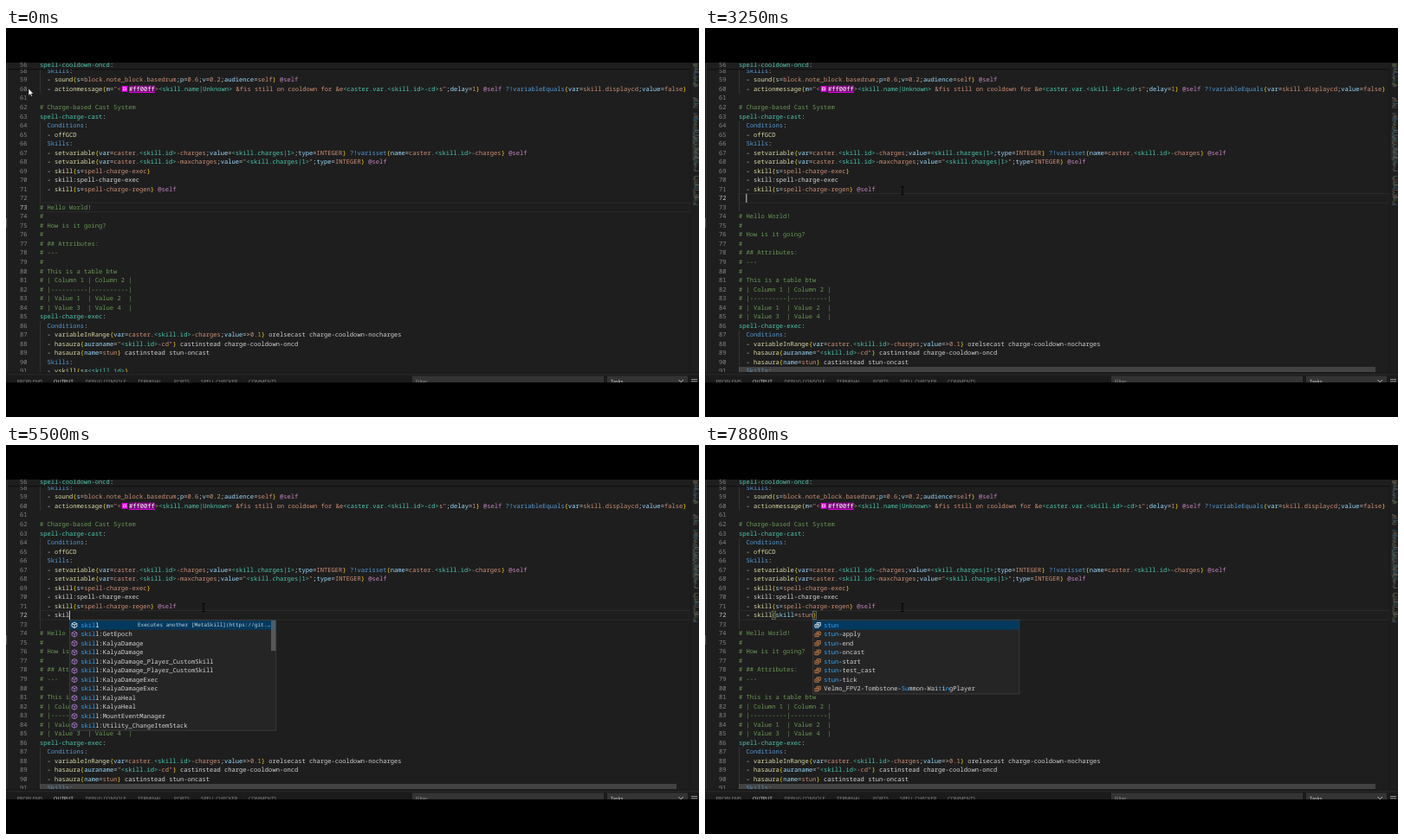
An HTML page that plays this animation: 800 by 450 pixels, repeating every 8000 ms.

```html
<!DOCTYPE html>
<html lang="en">
<head>
<meta charset="utf-8">
<title>Editor completion</title>
<style>
html, body { margin: 0; width: 100%; height: 100%; overflow: hidden; background: #000; }
svg { display: block; width: 800px; height: 450px; }
text { white-space: pre; text-rendering: geometricPrecision; }
.mono { font: 7.102px "Noto Sans Mono", "DejaVu Sans Mono", monospace; }
.mono .small { font-size: 6.09px; }
.ui { font: 5.75px "Open Sans", "Noto Sans", sans-serif; }
</style>
</head>
<body>
<svg viewBox="0 0 800 450">
  <defs>
    <clipPath id="view"><rect y="40" width="800" height="370"/></clipPath>
    <clipPath id="pane"><rect y="40" width="790" height="358"/></clipPath>
    <linearGradient id="shade" x2="0" y2="1">
      <stop stop-color="#000" stop-opacity=".6"/><stop offset="1" stop-color="#000" stop-opacity="0"/>
    </linearGradient>
    <g id="cube" fill="none" stroke-width=".8" stroke-linejoin="round">
      <path d="M0-3.2 2.9-1.7V1.7L0 3.2-2.9 1.7V-1.7ZM-2.9-1.7 0-.2 2.9-1.7M0-.2V3.2"/>
    </g>
    <g id="ref" fill="none" stroke-width=".8">
      <path d="M-1-.6V-2.8H3.2V.8H1.2M-3.2-.6H1V2.8H-3.2ZM-2 1.1H0M.4-1.2H2"/>
    </g>
  </defs>
  <g clip-path="url(#view)">
    <rect y="40" width="800" height="370" fill="#1e1e1e"/>
    <rect x="1" y="40" width="1" height="360" fill="#2b2b2b"/>
    <rect y="220" width="1" height="11" fill="#555"/>
    <g id="map"></g>
    <g id="code" class="mono" clip-path="url(#pane)"></g>
    <rect id="bar" x="39" y="392" width="749" height="6" fill="#797979" fill-opacity=".4"/>
    <g id="panel" class="ui"></g>
    <g id="popup" class="mono"></g>
    <g id="mouse">
      <path id="arrow" d="M0 0V8.2L1.9 6.5 3.2 9.3 4.4 8.8 3.2 6.1H5.7Z" fill="#fff" stroke="#000" stroke-width=".5"/>
      <path id="beam" d="M-1.8-4.5H-.5L0-4 .5-4.5H1.8M0-4V4M-1.8 4.5H-.5L0 4 .5 4.5H1.8" fill="none" stroke="#000" stroke-width="1"/>
    </g>
  </g>
</svg>
<script>
(() => {
const LOOP = 8000, CW = 4.261, LH = 10.53, X0 = 39;
const C = { text: '#d4d4d4', comment: '#6a9955', name: '#4ec9b0', key: '#569cd6', call: '#dcdcaa',
  brace: '#ffd700', arg: '#9cdcfe', value: '#ce9178', target: '#c586c0', match: '#2aaaff' };

const doc = `spell-cooldown-oncd:

  Skills:
  - sound{s=block.note_block.basedrum;p=0.6;v=0.2;audience=self} @self
  - actionmessage{m="<#ff00ff><skill.name|Unknown> &fis still on cooldown for &e<caster.var.<skill.id>-cd>s";delay=1} @self ?!variableEquals{var=skill.displaycd;value=false}

# Charge-based Cast System
spell-charge-cast:
  Conditions:
  - offGCD
  Skills:
  - setvariable{var=caster.<skill.id>-charges;value=<skill.charges|1>;type=INTEGER} ?!varisset{name=caster.<skill.id>-charges} @self
  - setvariable{var=caster.<skill.id>-maxcharges;value="<skill.charges|1>";type=INTEGER} @self
  - skill{s=spell-charge-exec}
  - skill:spell-charge-exec
  - skill{s=spell-charge-regen} @self

# Hello World!
#
# How is it going?
#
# ## Attributes:
# ---
#
# This is a table btw
# | Column 1 | Column 2 |
# |----------|----------|
# | Value 1  | Value 2  |
# | Value 3  | Value 4  |
spell-charge-exec:
  Conditions:
  - variableInRange{var=caster.<skill.id>-charges;value=>0.1} orelsecast charge-cooldown-nocharges
  - hasaura{auraname="<skill.id>-cd"} castinstead charge-cooldown-oncd
  - hasaura{name=stun} castinstead stun-oncast
  Skills:
  - vskill{s=<skill.id>}`.split('\n');
const FIRST = 56, EDIT = 72;

const lists = {
  mechanics: { icon: 'cube', thumb: 11, note: "Sends a message to the target player's ac…", noteX: 78,
    rows: 'actionmessa… activatespawner addscoreboardtag addtag addTrade addVar addVariable advancementmessage advmessage ai aigoal aigoals' },
  skills: { icon: 'cube', thumb: 35, note: 'Executes another [MetaSkill](https://git.…', noteX: 78.5,
    rows: 'skill skill:GetEpoch skill:KalyaDamage skill:KalyaDamage skill:KalyaDamage_Player_CustomSkill skill:KalyaDamage_Player_CustomSkill skill:KalyaDamageExec skill:KalyaDamageExec skill:KalyaHeal skill:KalyaHeal skill:MountEventManager skill:Utility_ChangeItemStack' },
  args: { icon: 'ref', thumb: 60,
    rows: 'skill branch chance cooldown delay forcesync fromorigin origin power repeat repeatinterval targetinterval' },
  arrows: { icon: 'ref', thumb: 11,
    rows: 'arrow-end arrow-fire arrow-hit_block arrow-hit_block-fx arrow-hit_entity arrow-hit_entity-fx arrow-remove arrow-start arrow-start-fx arrow-tick arrow-tick-fx arrow_spread-exec' },
  stuns: { icon: 'ref',
    rows: 'stun stun-apply stun-end stun-oncast stun-start stun-test_cast stun-tick Velmo_FPV2-Tombstone-Summon-WaitingPlayer' }
};

// time, current line, text being typed, completion list, matched letters
const steps = [
  [0, 73], [1875, 71],
  [3000, EDIT, '  '], [3500, EDIT, '  -'], [4000, EDIT, '  - ', 'mechanics', 0],
  [4875, EDIT, '  - s', 'skills', 1], [5120, EDIT, '  - sk', 'skills', 2],
  [5250, EDIT, '  - ski', 'skills', 3], [5490, EDIT, '  - skil', 'skills', 4],
  [5750, EDIT, '  - skill', 'skills', 5], [6000, EDIT, '  - skill{}', 'args', 0],
  [6870, EDIT, '  - skill{skill=}', 'arrows', 0], [7000, EDIT, '  - skill{skill=s}', 'stuns', 1],
  [7125, EDIT, '  - skill{skill=st}', 'stuns', 2], [7250, EDIT, '  - skill{skill=stu}', 'stuns', 3],
  [7375, EDIT, '  - skill{skill=stun}', 'stuns', 4]
];

const $ = id => document.getElementById(id);
const esc = s => s.replace(/&/g, '&amp;').replace(/</g, '&lt;');
const rect = (x, y, w, h, fill, more = '') => `<rect x="${x}" y="${y}" width="${w}" height="${h}" fill="${fill}" ${more}/>`;
const label = (x, y, s, fill, more = '') => `<text x="${x}" y="${y}" fill="${fill}" ${more}>${esc(s)}</text>`;
const rowMid = n => 60 + (n - 59) * LH;
const rowTop = n => rowMid(n) - LH / 2;
const colX = col => X0 + col * CW;

function tokens(s) {
  if (s[0] === '#') return [[s, C.comment]];
  if (/^\S+:$/.test(s)) return [[s.slice(0, -1), C.name], [':', C.text]];
  if (/^ +\w+:$/.test(s)) return [[s.slice(0, -1), C.key], [':', C.text]];
  const re = /(<#\w+>)|(<(?:[^<>]|<[^<>]*>)*>)|(@self)|(\?!\w+)|(\w+(?=\{)|offGCD)|([{}])|(\w+(?==))|([=;>])|([^<@?{}=;>\s]+|.)/g;
  let depth = 0;
  return [...s.matchAll(re)].map(m => {
    if (m[0] === '{') depth++;
    if (m[0] === '}') depth--;
    const kind = m.slice(1).findIndex(Boolean);
    const fill = ['hex', C.name, C.target, C.key, C.call, C.brace, C.arg, C.text, depth ? C.value : C.text][kind];
    return [m[0], fill];
  });
}

function codeLine(s, n) {
  const y = rowMid(n) + 2.4;
  let x = X0, out = '';
  for (const [word, fill] of tokens(s)) {
    if (fill === 'hex') {
      const hex = word.slice(1, -1), hx = x + CW + 9.3, w = hex.length * CW;
      out += label(x, y, '<', C.value) + rect(x + CW + 1, y - 5.8, 6.6, 6.6, hex)
        + rect(x + CW + 2.9, y - 3.9, 2.8, 2.8, 'none', 'stroke="#fff" stroke-width=".6"')
        + rect(hx, y - 6.4, w, 8.2, '#7a0a7a') + rect(hx, y + 1.2, w, .8, hex)
        + label(hx, y, hex, '#fff') + label(hx + w, y, '>', C.value);
      x = hx + w + CW;
    } else {
      if (word.trim()) out += label(x.toFixed(2), y, word, fill);
      x += word.length * CW;
    }
  }
  return out;
}

// Boxes behind each "self", allowing for the colour swatch
function selfMarks(s, n) {
  return [...s.matchAll(/\bself\b/g)].map(m =>
    rect(colX(m.index) + (s.includes('<#') ? 9.3 : 0), rowTop(n), 4 * CW, LH, '#474747')).join('');
}

const caretCol = s => s.length - (s.endsWith('}') ? 1 : 0);

function drawCode([, line, typed], caret) {
  const lines = doc.slice();
  if (typed !== undefined) lines.splice(EDIT - FIRST, 0, typed);
  let out = rect(X0, rowTop(line), 751, LH, 'none', 'stroke="#2c2c2c" stroke-width=".9"');
  lines.forEach((s, i) => {
    const n = FIRST + i;
    if (i < 2 || n > 91) return;
    if (/^ /.test(s) || (!s && n > 71)) out += rect(X0 + .2, rowTop(n), .6, LH, '#404040');
    if (line === 71) out += selfMarks(s, n);
    out += codeLine(s, n);
    out += label(24.6, rowMid(n) + 2.4, String(n), n === line ? '#c6c6c6' : '#858585', 'text-anchor="end"');
  });
  if (typed && typed.endsWith('}'))
    for (const col of [typed.indexOf('{'), typed.length - 1])
      out += rect(colX(col), rowTop(EDIT) + .6, CW, LH - 1.2, '#006400', 'fill-opacity=".1" stroke="#888" stroke-width=".6"');
  if (caret) {
    const s = typed !== undefined ? typed : doc[line - FIRST];
    out += rect(colX(caretCol(s)) - .2, rowTop(line) + .2, 1, LH - .4, '#d0d0d0');
  }
  // pinned heading
  out += rect(2, 40, 788, 7.4, '#1e1e1e') + rect(2, 47.2, 788, 2, 'url(#shade)');
  out += label(X0, 44.9, 'spell-cooldown-oncd', C.name) + label(colX(19), 44.9, ':', C.text)
    + label(24.6, 44.9, '56', '#858585', 'text-anchor="end"');
  return out;
}

function drawPopup([, , typed, key, hits]) {
  if (!key) return '';
  const list = lists[key], rows = list.rows.split(' ');
  const x = colX(caretCol(typed)) + .3, y = rowTop(EDIT + 1) + .4, w = 238.4;
  const tone = list.icon === 'cube' ? '#b180d7' : '#d98a50';
  const hit = s => `<tspan fill="${C.match}">${s}</tspan>`;
  let out = rect(x, y, w, rows.length * LH + 1.2, '#252526', 'stroke="#454545" stroke-width=".7"');
  out += rect(x + .4, y + .5, w - .8, LH, '#04395e');
  rows.forEach((s, i) => {
    const cy = y + .5 + (i + .5) * LH;
    const inner = s.startsWith('Velmo') ? s.replace(/Su|t(?=ing)|n(?=gP)/g, hit) : hit(s.slice(0, hits)) + s.slice(hits);
    out += `<use href="#${list.icon}" x="${x + 5.6}" y="${cy}" stroke="${i ? tone : '#fff'}"/>`
      + `<text x="${x + 12.8}" y="${cy + 2.4}" fill="${i ? C.text : '#fff'}">${inner}</text>`;
  });
  if (list.note) out += label(x + list.noteX, y + 7.7, list.note, '#c3d3df', 'class="small"');
  if (list.thumb) out += rect(x + w - 5.8, y + .5, 5.4, list.thumb, '#797979', 'fill-opacity=".6"');
  return out;
}

function drawPanel() {
  const tabs = { PROBLEMS: 12.5, OUTPUT: 55, 'DEBUG CONSOLE': 91.5, TERMINAL: 152, PORTS: 194, 'SPELL CHECKER': 225, COMMENTS: 280 };
  let out = rect(0, 398, 800, 12, '#1b1b1b') + rect(0, 400.5, 800, .7, '#333');
  for (const t in tabs) out += label(tabs[t], 411, t, t === 'OUTPUT' ? '#e7e7e7' : '#8d8d8d');
  return out + rect(469, 402.5, 221, 8, '#343434') + label(473, 411, 'Filter', '#9a9a9a')
    + rect(694, 402.5, 93, 8, '#343434') + label(698, 411, 'Tasks', '#e0e0e0')
    + '<path d="M776.5 407l2.7 2.7 2.7-2.7" fill="none" stroke="#ccc" stroke-width=".9"/>'
    + rect(791, 406, 7, .8, '#b5b5b5') + rect(791, 408.4, 7, .8, '#b5b5b5');
}

function drawMap() {
  let seed = 7;
  const rnd = () => (seed = seed * 16807 % 2147483647) / 2147483647;
  const inks = ['#4f7f79', '#8a6654', '#55704a', '#77796a', '#456a8a'];
  let out = rect(789.6, 40, .6, 360, '#171717') + rect(792, 118, 8, 34, '#797979', 'fill-opacity=".12"');
  for (let y = 41; y < 205; y += 1.15) {
    const gap = (y > 68 && y < 79) || (y > 92 && y < 98) || (y > 166 && y < 170);
    const x = 793 + Math.floor(rnd() * 3) * .8, w = 1.5 + rnd() * 5, ink = inks[Math.floor(rnd() * 5)];
    if (!gap) out += rect(x.toFixed(1), y.toFixed(2), Math.min(w, 800 - x).toFixed(1), .7, ink, 'opacity=".75"');
  }
  return out;
}

const route = [[0, 26, 70], [130, 26, 70], [750, 171, 271], [1000, 176, 268], [1700, 228, 188], [LOOP, 228, 188]];
function mouseAt(t) {
  const i = route.findIndex(p => p[0] > t), [t0, x0, y0] = route[i - 1], [t1, x1, y1] = route[i];
  const u = (t - t0) / (t1 - t0), k = u * u * (3 - 2 * u);
  return [x0 + (x1 - x0) * k, y0 + (y1 - y0) * k];
}

$('map').innerHTML = drawMap();
$('panel').innerHTML = drawPanel();
const begin = performance.now();
let drawn = '';

function frame() {
  const t = (performance.now() - begin) % LOOP;
  const i = steps.filter(s => s[0] <= t).length - 1, step = steps[i];
  const caret = i > 0 && (t - step[0]) % 1000 < 500;
  const state = i + '/' + caret;
  if (state !== drawn) {
    drawn = state;
    $('code').innerHTML = drawCode(step, caret);
    $('popup').innerHTML = drawPopup(step);
    $('bar').setAttribute('width', step[2] === undefined ? 749 : 735);
  }
  const [x, y] = mouseAt(t), inText = x > X0;
  $('mouse').setAttribute('transform', `translate(${x.toFixed(2)} ${y.toFixed(2)})`);
  $('arrow').style.display = inText ? 'none' : '';
  $('beam').style.display = inText ? '' : 'none';
  $('bar').setAttribute('opacity', Math.min(1, Math.max(0, (t - 280) / 100)));
  requestAnimationFrame(frame);
}
frame();
})();
</script>
</body>
</html>
```
